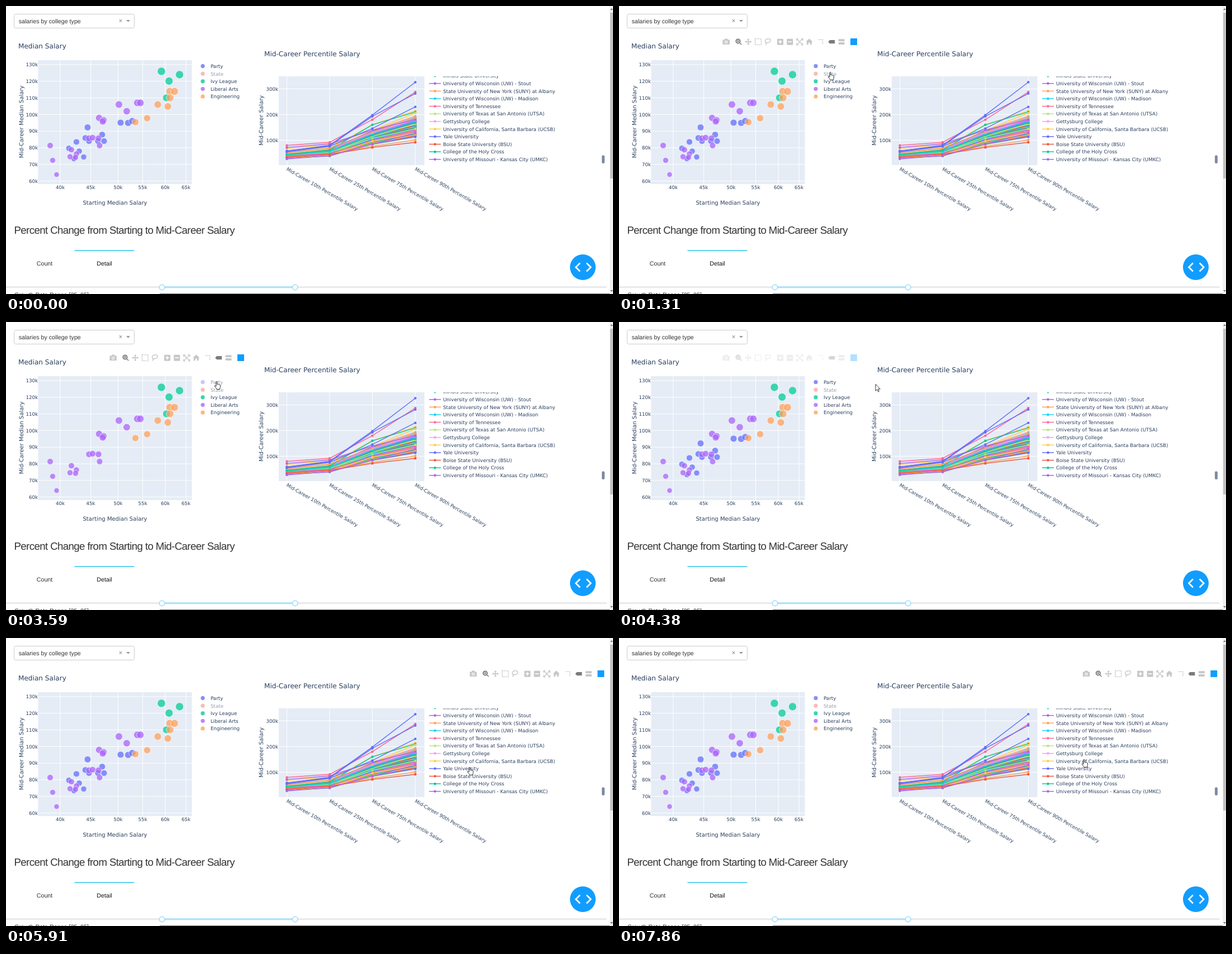
An HTML page that plays this animation: 1086x516 px, repeating every 8 s.

```html
<!DOCTYPE html>
<html lang="en">
<head>
<meta charset="utf-8">
<title>College salaries</title>
<style>
html, body { margin: 0; width: 100%; height: 100%; overflow: hidden; background: #fff; }
svg { display: block; width: 1086px; height: 516px; }
text { font-family: "DejaVu Sans", Verdana, sans-serif; font-size: 8.7px; fill: #2a3f5f; text-rendering: geometricPrecision; }
.title { font-size: 12.1px; }
.axis { font-size: 10.1px; }
.ui { font-family: "Liberation Sans", Arial, sans-serif; font-size: 10.7px; fill: #333; }
.heading { font-size: 18.7px; letter-spacing: -.62px; }
.mid { text-anchor: middle; }
.end { text-anchor: end; }
.grid { stroke: #fff; stroke-width: 1; }

/* One shared 8 s clock: 1% = 80 ms */
.anim { animation: 8s step-end infinite; }
.wide { animation-name: wide; }
.narrow { animation-name: narrow; }
.party { animation-name: party; }
.party-key { animation-name: party-key; }
.state-key { animation-name: state-key; }
.yale { animation-name: yale; }
.no-yale { animation-name: no-yale; }
.yale-key { animation-name: yale-key; }
.bar-left { animation-name: bar-left; animation-timing-function: ease-out; }
.bar-right { animation-name: bar-right; animation-timing-function: ease-out; }
.cursor { animation-name: move; animation-timing-function: linear; }
.arrow { animation-name: arrow; }
.cross { animation-name: cross; }
.hand { animation-name: hand; }
.ring { animation-name: ring; }

@keyframes narrow { 0%, 31.125%, 100% { opacity: 1 } 21.25% { opacity: 0 } }
@keyframes wide { 0%, 31.125%, 100% { opacity: 0 } 21.25% { opacity: 1 } }
@keyframes state-key { 0%, 31.125%, 100% { opacity: .5 } 21.25% { opacity: 1 } }
@keyframes party { 0%, 49.5%, 100% { opacity: 1 } 41% { opacity: 0 } }
@keyframes party-key { 0%, 49.5%, 100% { opacity: 1 } 41% { opacity: .5 } }
@keyframes yale { 0%, 95%, 100% { opacity: 1 } 83.5% { opacity: 0 } }
@keyframes no-yale { 0%, 95%, 100% { opacity: 0 } 83.5% { opacity: 1 } }
@keyframes yale-key { 0%, 95%, 100% { opacity: 1 } 83.5% { opacity: .5 } }
@keyframes bar-left { 0%, 7.5% { opacity: 0 } 10%, 53.5% { opacity: 1 } 56%, 100% { opacity: 0 } }
@keyframes bar-right {
  0%, 3.75% { opacity: 0 } 6%, 6.75% { opacity: 1 } 8.75%, 55% { opacity: 0 } 58%, 100% { opacity: 1 }
}
@keyframes move {
  0%, .85% { transform: translate(640px, 520px) }
  4% { transform: translate(600px, 380px) }
  6.25% { transform: translate(500px, 210px) }
  8.5% { transform: translate(415px, 138px) }
  10.375%, 31.125% { transform: translate(378px, 119px) }
  33.875%, 53% { transform: translate(377px, 107px) }
  55% { transform: translate(470px, 112px) }
  57% { transform: translate(640px, 140px) }
  59.875% { transform: translate(839px, 174px) }
  62.875%, 63.125% { transform: translate(836px, 238px) }
  65.625%, 68.5% { transform: translate(836px, 260px) }
  70.25%, 95% { transform: translate(829.5px, 232px) }
  98.25%, 100% { transform: translate(832px, 218px) }
}
@keyframes arrow { 0%, 6.75%, 53.375% { opacity: 1 } 5.25%, 8.5%, 56%, 100% { opacity: 0 } }
@keyframes cross { 0%, 6.75%, 58.625%, 100% { opacity: 0 } 5.25%, 56% { opacity: 1 } }
@keyframes hand { 0%, 53.375% { opacity: 0 } 8.5%, 58.625%, 100% { opacity: 1 } }
@keyframes ring {
  0%, 16.375%, 26.75%, 36.625%, 44.875%, 73.875%, 89.875%, 100% { opacity: 0 }
  15.5%, 25.75%, 35.875%, 44.375%, 73%, 88.875% { opacity: 1 }
}
</style>
</head>
<body>
<svg id="stage" viewBox="0 0 1086 516">
  <defs>
    <clipPath id="legendClip"><rect x="750" y="126" width="330" height="160"/></clipPath>
    <clipPath id="linesClip"><rect x="488" y="126" width="261" height="159"/></clipPath>
    <g id="modebar" fill="#c7c7c7" stroke="none">
      <path d="M185.500 60.500h3l1.200-2h4l1.200 2h3v8.500h-12.400z"/><circle cx="191.700" cy="64.600" r="2.700" fill="#fff"/><circle cx="191.700" cy="64.600" r="1.500"/>
      <g fill="none" stroke="#7c7c7c" stroke-width="2"><circle cx="213" cy="63" r="3.600"/><path d="M215.800 65.800l3.500 3.500M211.300 63h3.400M213 61.300v3.400" stroke-width="1.500"/></g>
      <path d="M231.300 58l2.400 2.800h-1.600v2.500h2.500v-1.600l2.800 2.400-2.800 2.400v-1.600h-2.500v2.500h1.600l-2.400 2.800-2.400-2.800h1.600v-2.500H228v1.600l-2.800-2.400 2.800-2.400v1.600h2.500v-2.500h-1.600z"/>
      <g fill="none" stroke="#c7c7c7" stroke-width="1.500">
        <rect x="243.500" y="58.700" width="10.800" height="10.800" stroke-dasharray="1.800 1.200"/>
        <ellipse cx="266.300" cy="62.300" rx="4.900" ry="3.400" transform="rotate(-14 266 62)"/><path d="M262.500 64.500c-1 1.500 1.700 1 1.200 2.600s-1.600 1.200-1.900 2.200"/>
        <path d="M319 60l8.500 8.500M327.500 60l-8.500 8.500M317.700 62v-3.300h3M325.700 58.700h3V62M328.700 66.500v3.200h-3M320.700 69.700h-3v-3.200"/>
        <path d="M357 60.300h7.500v9" stroke-dasharray="2 1.300"/>
      </g>
      <rect x="283" y="58.700" width="11" height="11" rx="1"/><path d="M285.300 64.200h6.400M288.500 61v6.400" stroke="#fff" stroke-width="1.700"/>
      <rect x="300.300" y="58.700" width="11" height="11" rx="1"/><path d="M302.600 64.200h6.400" stroke="#fff" stroke-width="1.700"/>
      <path d="M340.300 58.500l6 5.600h-1.500v5.200h-3v-3.500h-3v3.500h-3v-5.200h-1.500z"/>
      <path d="M374.200 64.200l2.900-3.100h9v6.200h-9z" fill="#7c7c7c"/>
      <path d="M392 61.300l1.500-2h10v4h-10zM392 67l1.500-2h10v4h-10z"/>
      <rect x="414" y="58" width="12" height="12" fill="#119dff"/>
    </g>
  </defs>

  <rect x="14.500" y="14.500" width="215" height="25" rx="3" fill="#fff" stroke="#ccc"/>
  <text class="ui" x="22.700" y="30.500">salaries by college type</text>
  <path d="M202.800 24.200l4.400 4.400m0-4.400l-4.400 4.400" stroke="#999" stroke-width="1.100"/>
  <path d="M215 25h7l-3.500 3.700z" fill="#999"/>

  <g id="scatter"></g>
  <g id="percentiles"></g>

  <text class="ui heading" x="14.500" y="408">Percent Change from Starting to Mid-Career Salary</text>
  <rect x="122.500" y="437.400" width="107" height="1.500" fill="#2cc4ee"/>
  <text class="ui mid" x="69" y="464.800">Count</text>
  <text class="ui mid" x="176" y="465" style="fill:#111">Detail</text>
  <text class="ui" x="15" y="521">Growth Rate Range [25, 95]</text>
  <path d="M275 515.500h805" stroke="#777"/>
  <rect y="502.300" width="1075" height="3" rx="1.500" fill="#e9e9e9"/>
  <rect x="279" y="502.300" width="238" height="3" fill="#abe2fb"/>
  <g fill="#fff" stroke="#96dbfa" stroke-width="1.500"><circle cx="279" cy="504" r="4.700"/><circle cx="517.300" cy="504" r="4.700"/></g>

  <circle cx="1032" cy="468" r="23" fill="#119dff"/>
  <path d="M1027 460.500l-7.500 7.500 7.500 7.500M1038.700 460.500l7.500 7.500-7.500 7.500" fill="none" stroke="#fff" stroke-width="2.700"/>

  <rect x="1080" width="6" height="516" fill="#f1f1f1"/>
  <rect x="1081" y="12" width="5" height="297" fill="#c1c1c1"/>
  <path d="M1081 7l2.500-3 2.500 3z" fill="#777"/><path d="M1081 509l2.500 3 2.500-3z" fill="#777"/>

  <use href="#modebar" class="anim bar-left"/>
  <g class="anim bar-right"><use href="#modebar" x="644.300"/></g>

  <g class="anim cursor">
    <g class="anim ring" fill="none"><circle r="8.500" stroke="#000"/><circle r="7.600" stroke="#fff"/></g>
    <path class="anim arrow" d="M0 0v12l2.800-2.600 1.800 4.200 1.800-.8-1.800-4.100h3.700z" fill="#fff" stroke="#000" stroke-width=".8"/>
    <path class="anim cross" d="M-7 0h14M0-7v14" stroke="#222" stroke-width="1.100"/>
    <path class="anim hand" d="M-1 .7c0-1.500 2-1.500 2 0v4.100c.5-.8 1.700-.6 1.900.3.600-.6 1.600-.4 1.800.5.700-.5 1.700 0 1.700 1v3c0 1.700-1.200 2.300-1.200 4h-5c-.3-1.700-3.600-4.500-3.900-5.900-.2-1 1.300-1.500 2.700.5z" fill="#fff" stroke="#111" stroke-width=".9"/>
  </g>
</svg>

<script>
const palette = ["#636efa", "#ef553b", "#00cc96", "#ab63fa", "#ffa15a", "#19d3f3", "#ff6692", "#b6e880", "#ff97ff", "#fecb52"];

function makeRandom(seed) {
  return () => (seed = (seed * 16807) % 2147483647) / 2147483647;
}
const range = (from, to, step) => Array.from({ length: Math.floor((to - from) / step) + 1 }, (_, i) => from + i * step);
const text = (x, y, body, cls = "", extra = "") => `<text x="${x}" y="${y}" class="${cls}" ${extra}>${body}</text>`;
const group = (cls, body) => `<g class="${cls}">${body}</g>`;
const line = (x1, y1, x2, y2) => `<path class="grid" d="M${x1} ${y1}L${x2} ${y2}"/>`;
const panel = (x, y, w, h) => `<rect x="${x}" y="${y}" width="${w}" height="${h}" fill="#e5ecf6"/>`;

// ---- Scatter chart: points are placed on the narrow axes ----
const types = ["Party", "State", "Ivy League", "Liberal Arts", "Engineering"];
const points = {
  "Party": [[146, 217.5], [112.5, 255], [126, 243.5], [131, 260], [121.5, 273.5], [139, 270.5], [142, 236.5], [148.5, 242],
    [164.5, 242], [172, 230.5], [175.5, 242], [205, 209], [218.5, 209.5], [226, 206]],
  "Ivy League": [[278, 117], [310.5, 123], [291.7, 134.5], [287, 164.5]],
  "Liberal Arts": [[79, 250], [83.5, 276.5], [90.5, 302], [117, 257.5], [114.5, 270], [126, 265], [124.5, 271], [148.5, 237],
    [155, 236], [165.5, 237], [167.5, 250], [166.5, 200.5], [174.5, 204.5], [173, 207], [202, 176.5], [216, 188.5],
    [235, 173.5], [240.3, 173.5]],
  "Engineering": [[293, 153], [301.5, 153], [293.5, 164.5], [271.5, 176.5], [289.5, 180], [252.5, 201], [231.5, 208]]
};
const narrowX = k => 97 + 1067.6 * Math.log10(k / 40);
const narrowY = k => 105 + 2.98 * (130 - k);
const salaryAt = y => 130 - (y - 105) / 2.98;
const radiusAt = y => 7.2 * (salaryAt(y) / 126) ** .62;
const keep = { x: x => x, y: y => y };
const widen = { x: x => 128 + .8645 * (x - 97), y: y => 117 + .768 * (y - 117) };

const rnd = makeRandom(4177);
const bell = () => rnd() + rnd() + rnd() + rnd() - 2;
points.State = [[35.3, 43.9], [34.8, 60.5], [59.9, 112]].concat(range(1, 150, 1).map(() => {
  const start = 44.3 + 6.5 * bell();
  return [start, 1.77 * start + 9 * bell()];
})).map(([s, m]) => [narrowX(s), narrowY(m)]);

function scatterView(view, xTicks, yTicks, shown) {
  const grid = xTicks.map(k => {
    const x = view.x(narrowX(k));
    return line(x, 97, x, 319) + text(x, 328.3, k + "k", "mid");
  }).join("") + yTicks.map(k => {
    const y = view.y(narrowY(k));
    return line(57.5, y, 332.5, y) + text(57, y + 3.2, k + "k", "end");
  }).join("");
  const dots = shown.map(type => {
    const color = palette[types.indexOf(type)];
    return group(type === "Party" ? "anim party" : "", points[type].map(([x, y]) =>
      `<circle cx="${view.x(x)}" cy="${view.y(y)}" r="${radiusAt(y)}" fill="${color}" stroke="#fff" stroke-width=".75" opacity=".74"/>`).join(""));
  }).join("");
  return grid + dots;
}

const typeKeys = types.map((type, i) => {
  const y = 107.7 + 13.62 * i;
  const cls = { Party: "anim party-key", State: "anim state-key" }[type] || "";
  return group(cls, `<circle cx="352" cy="${y}" r="3.6" fill="${palette[i]}" opacity=".78"/>` + text(366, y + 3.2, type));
}).join("");

document.getElementById("scatter").innerHTML =
  text(22, 76, "Median Salary", "title") + panel(57.5, 97, 275, 222) +
  group("anim narrow", scatterView(keep, range(40, 65, 5), range(60, 130, 10), types.filter(t => t !== "State"))) +
  group("anim wide", scatterView(widen, range(35, 65, 5), range(40, 120, 20), types)) +
  text(195, 356, "Starting Median Salary", "axis mid") +
  text(0, 0, "Mid-Career Median Salary", "axis mid", 'transform="translate(31 207.500)rotate(-90)"') + typeKeys;

// ---- Percentile chart ----
const columns = [502.5, 579, 655.5, 732.3];
const rand = makeRandom(90210);
const series = range(0, 79, 1).map(i => {
  const q = rand();
  const p10 = 28 + 21 * q ** 1.4 + 7 * rand();
  const p75 = 77 + 52 * q + 12 * rand();
  return [palette[(i * 3 + 1) % 10], p10, p10 * 1.18 + 6 * rand(), p75, p75 * (1.32 + .1 * rand())];
}).concat([
  ["#fecb52", 46, 68, 161, 214], ["#00cc96", 45, 62, 160, 210], ["#fecb52", 68, 82, 139, 206],
  ["#ffa15a", 52, 70, 133, 186], ["#ab63fa", 72, 86, 140, 180], ["#636efa", 55, 76, 146, 230],
  ["#ffa15a", 33, 45, 76, 101], ["#ef553b", 33, 45, 72, 92], ["#ab63fa", 27, 40, 85, 128],
  ["#ff6692", 80, 92, 180, 288], ["#636efa", 58, 78, 193, 282]
]);
const yale = ["#636efa", 58, 80, 198, 326];

function percentileView(scale, data) {
  const grid = [100, 200, 300].map(k => line(488, scale(k), 748.5, scale(k)) + text(487, scale(k) + 3.2, k + "k", "end")).join("");
  const traces = data.map(([color, ...values]) => {
    const spots = values.map((k, i) => [columns[i], scale(k)]);
    return `<polyline points="${spots.join(" ")}" fill="none" stroke="${color}" stroke-width="1.45"/>` +
      spots.map(([x, y]) => `<circle cx="${x}" cy="${y}" r="2.2" fill="${color}"/>`).join("");
  }).join("");
  return grid + `<g clip-path="url(#linesClip)">${traces}</g>`;
}

const schools = [
  ["Illinois State University", 2], ["University of Wisconsin (UW) - Stout", 3],
  ["State University of New York (SUNY) at Albany", 4], ["University of Wisconsin (UW) - Madison", 5],
  ["University of Tennessee", 6], ["University of Texas at San Antonio (UTSA)", 7], ["Gettysburg College", 8],
  ["University of California, Santa Barbara (UCSB)", 9], ["Yale University", 0], ["Boise State University (BSU)", 1],
  ["College of the Holy Cross", 2], ["University of Missouri - Kansas City (UMKC)", 3]
];
const schoolKeys = schools.map(([name, hue], i) => {
  const y = 125.2 + 13.6 * i;
  return group(name.startsWith("Yale") ? "anim yale-key" : "",
    `<path d="M757 ${y}h21" stroke="${palette[hue]}" stroke-width="1.5"/><circle cx="767.500" cy="${y}" r="2.2" fill="${palette[hue]}"/>` +
    text(782, y + 3.2, name));
}).join("");

document.getElementById("percentiles").innerHTML =
  text(462, 90, "Mid-Career Percentile Salary", "title") + panel(488, 126, 260.5, 159) +
  columns.map(x => line(x, 126, x, 285)).join("") +
  group("anim yale", percentileView(k => 286.5 - .46 * k, [...series, yale])) +
  group("anim no-yale", percentileView(k => 274.1 - .527 * (k - 27), series)) +
  ["10th", "25th", "75th", "90th"].map((rank, i) =>
    text(0, 0, `Mid-Career ${rank} Percentile Salary`, "", `transform="translate(${columns[i] - 1.5} 294)rotate(30)"`)).join("") +
  text(0, 0, "Mid-Career Salary", "axis mid", 'transform="translate(460 205)rotate(-90)"') +
  `<g clip-path="url(#legendClip)">${schoolKeys}</g>` +
  '<rect x="1066" y="267.500" width="5" height="14.500" rx="2" fill="#808ba4"/>';
</script>
</body>
</html>
```
